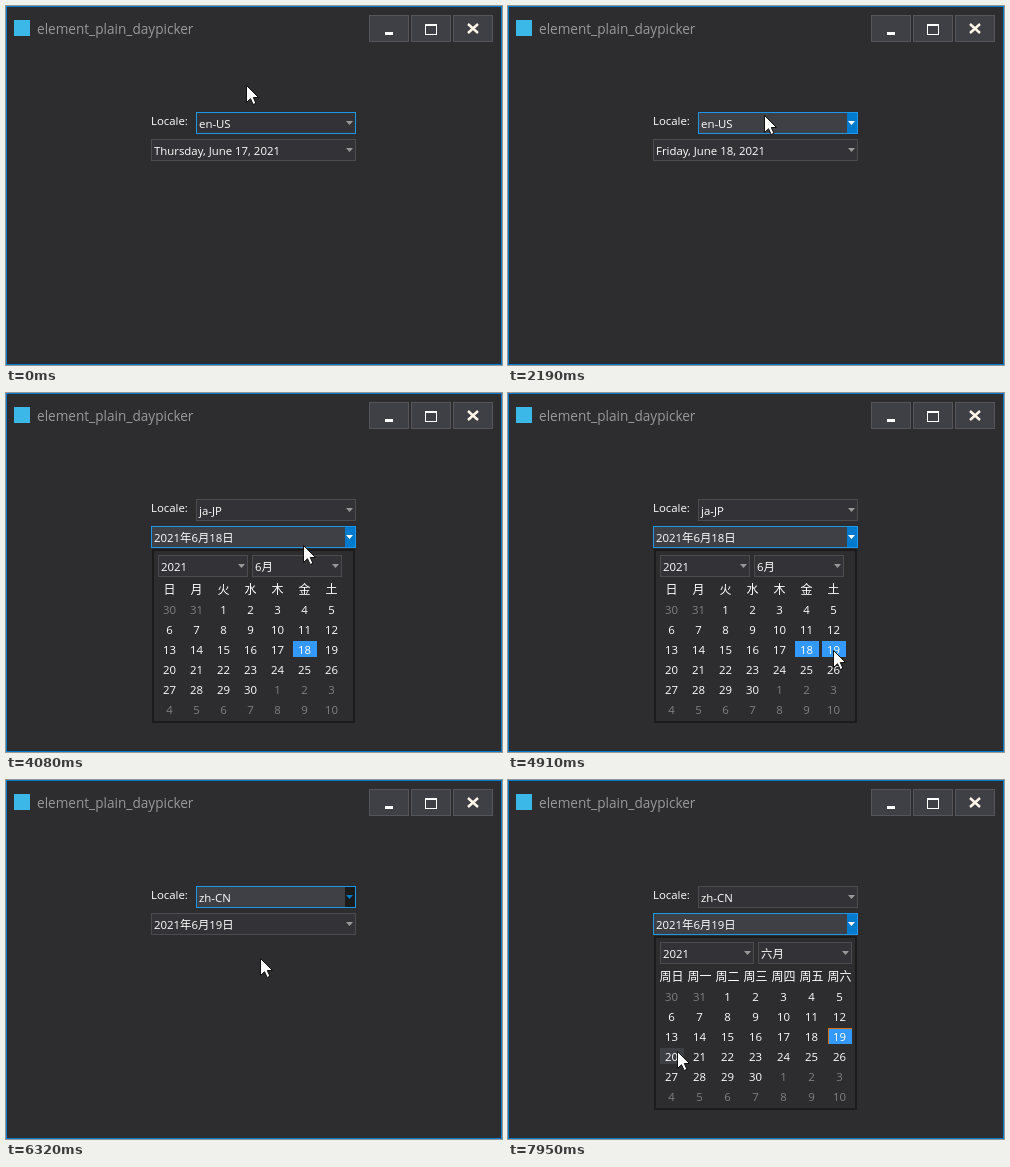
These frames come from a looping animation (496 by 359 pixels, 8 s). An HTML page with a canvas:

```html
<!DOCTYPE html>
<html lang="en">
<head>
<meta charset="utf-8">
<title>Date combo</title>
<style>
html, body { margin: 0; width: 100%; height: 100%; overflow: hidden; background: #2d2d30; }
canvas { display: block; }
</style>
</head>
<body>
<canvas id="stage" width="496" height="359"></canvas>
<script>
const ctx = document.getElementById('stage').getContext('2d');
const LOOP = 8000;
const BLUE = '#007acc', FOCUS = '#1c97ea', SELECTED = '#3399ff';
const BACK = '#2d2d30', FIELD = '#333337', HOT = '#3f3f46', DARK = '#1b1b1c', LINE = '#4b4b50';
const WHITE = '#ffffff', GRAY = '#999999', DIM = '#808080';

const LOCALES = [
  { name: 'en-US', month: 'June', step: 27, days: ['Sun', 'Mon', 'Tue', 'Wed', 'Thu', 'Fri', 'Sat'],
    date: d => `${['Thursday', 'Friday', 'Saturday'][d - 17]}, June ${d}, 2021` },
  { name: 'ja-JP', month: '6月', step: 27, days: [...'日月火水木金土'],
    date: d => `2021年6月${d}日` },
  { name: 'zh-CN', month: '六月', step: 28, days: [...'日一二三四五六'].map(c => '周' + c),
    date: d => `2021年6月${d}日` }
];

// Pointer moves: start time, end time, destination
const START = [240, 79];
const MOVES = [
  [70, 320, 256, 148], [760, 1240, 302, 257], [1580, 1960, 256, 109],
  [2550, 2860, 252, 161], [3220, 3640, 297, 152], [4100, 4400, 325, 257],
  [5060, 5450, 262, 114], [5850, 6120, 254, 178], [6450, 6620, 256, 146],
  [7310, 7950, 169, 271]
];
// Popups: owner, opening time, closing time, time the button is released
const POPUPS = [
  ['date', 620, 1500, 1580], ['locale', 2360, 3140, 3220], ['date', 3860, 5000, 5060],
  ['locale', 5710, 6240, 6450], ['date', 6740, LOOP, LOOP]
];
const FOCUS_CHANGES = [490, 2190, 3780, 5630, 6660];
const LOCALE_CHANGES = [3140, 6240];
const DAY_CHANGES = [1500, 5000];
const DAY_PRESSES = [[1380, 18], [4910, 19]];

const passed = (times, t) => times.filter(time => t >= time).length;

function pointerAt(t) {
  let [x, y] = START;
  for (const [from, to, endX, endY] of MOVES) {
    if (t < from) break;
    const p = Math.min(1, (t - from) / (to - from));
    const eased = p * p * (3 - 2 * p);
    x += (endX - x) * eased;
    y += (endY - y) * eased;
  }
  return [Math.round(x), Math.round(y)];
}

function rect(x, y, w, h, color) {
  ctx.fillStyle = color;
  ctx.fillRect(x, y, w, h);
}

function frame(x, y, w, h, fill, border) {
  rect(x, y, w, h, border);
  rect(x + 1, y + 1, w - 2, h - 2, fill);
}

function text(string, x, y, color = WHITE, size = 11.4, align = 'left') {
  ctx.font = `${size}px "Open Sans", "Noto Sans CJK SC", "Noto Sans CJK JP", "Noto Sans CJK", sans-serif`;
  ctx.textAlign = align;
  ctx.fillStyle = color;
  ctx.fillText(string, x, y);
}

function polygon(points, color) {
  ctx.beginPath();
  points.forEach(([x, y]) => ctx.lineTo(x, y));
  ctx.closePath();
  ctx.fillStyle = color;
  ctx.fill();
}

function inside([px, py], x, y, w, h) {
  return px >= x && px < x + w && py >= y && py < y + h;
}

function combo(x, y, w, label, { focused = false, hot = false, pressed = false } = {}) {
  const active = hot || pressed;
  const right = x + w;
  frame(x, y, w, 22, active ? HOT : FIELD, focused ? FOCUS : LINE);
  if (active) rect(right - 11, y + 1, 10, 20, pressed ? DARK : BLUE);
  const arrow = pressed ? BLUE : hot ? WHITE : GRAY;
  polygon([[right - 10, y + 9], [right - 3, y + 9], [right - 6.5, y + 13]], arrow);
  text(label, x + 3, y + 16);
}

function titleBar() {
  frame(0, 0, 496, 359, BACK, BLUE);
  rect(8, 14, 16, 16, '#3bb8e8');
  text('element_plain_daypicker', 31, 28, GRAY, 13.6);
  for (const x of [363, 405, 447]) frame(x, 9, 40, 27, HOT, '#55555b');
  rect(379, 26, 8, 3, WHITE);
  frame(419, 18, 12, 11, HOT, WHITE);
  rect(419, 18, 12, 2, WHITE);
  ctx.strokeStyle = '#fff8ea';
  ctx.lineWidth = 2.4;
  ctx.beginPath();
  ctx.moveTo(462, 18); ctx.lineTo(472, 27);
  ctx.moveTo(472, 18); ctx.lineTo(462, 27);
  ctx.stroke();
}

function localeList(current, pointer) {
  rect(191, 129, 158, 66, DARK);
  frame(193, 131, 154, 62, '#252526', LINE);
  LOCALES.forEach(({ name }, i) => {
    const y = 132 + 20 * i;
    if (i === current) rect(194, y, 152, 20, SELECTED);
    else if (inside(pointer, 194, y, 152, 20)) rect(194, y, 152, 20, HOT);
    text(name, 199, y + 15);
  });
}

function calendar(localeIndex, selected, pressedDay, pointer) {
  const { month, step, days } = LOCALES[localeIndex];
  const comboWidth = localeIndex === 2 ? 94 : 90;
  frame(146, 156, 203, 174, BACK, DARK);
  frame(147, 157, 201, 172, BACK, DARK);
  [['2021', 152], [month, 156 + comboWidth]].forEach(([label, x]) =>
    combo(x, 162, comboWidth, label, { hot: inside(pointer, x, 162, comboWidth, 22) }));
  days.forEach((day, i) =>
    text(day, 163.5 + step * i, 201, WHITE, localeIndex ? 12 : 11.4, 'center'));

  for (let i = 0; i < 42; i++) {
    const x = 152 + step * (i % 7), y = 208 + 20 * Math.floor(i / 7);
    const offset = i - 1;
    const inMonth = offset >= 1 && offset <= 30;
    const label = offset < 1 ? 31 + offset : inMonth ? offset : offset - 30;
    if (inMonth && (offset === selected || offset === pressedDay)) {
      rect(x, y, 24, 16, SELECTED);
      if (localeIndex === 2) {
        rect(x, y, 24, 1, '#d9730d');
        rect(x, y, 1, 16, '#d9730d');
      }
    } else if (inside(pointer, x, y, 24, 16)) {
      rect(x, y, 24, 16, HOT);
    }
    text(label, x + 11.5, y + 12.5, inMonth ? WHITE : DIM, 11.4, 'center');
  }
}

function drawPointer([x, y]) {
  const shape = [[0, 0], [0, 17], [4, 13.2], [6.7, 19], [9.4, 17.8], [6.8, 12], [12, 12]]
    .map(([dx, dy]) => [x + dx + .5, y + dy + .5]);
  polygon(shape, WHITE);
  ctx.strokeStyle = '#111';
  ctx.lineWidth = 1;
  ctx.stroke();
}

function draw(t) {
  const pointer = pointerAt(t);
  const localeIndex = passed(LOCALE_CHANGES, t);
  const day = 17 + passed(DAY_CHANGES, t);
  const focus = passed(FOCUS_CHANGES, t) % 2 ? 'date' : 'locale';
  const popup = POPUPS.find(([, from, to]) => t >= from && t < to);
  const open = popup && popup[0];
  const released = POPUPS.find(([, , to, end]) => t >= to && t < end);
  const style = (name, x, y, w) => ({
    focused: focus === name,
    hot: open ? open === name : inside(pointer, x, y, w, 22),
    pressed: Boolean(released && released[0] === name)
  });

  titleBar();
  text('Locale:', 145, 119);
  combo(190, 106, 160, LOCALES[localeIndex].name, style('locale', 190, 106, 160));
  combo(145, 133, 205, LOCALES[localeIndex].date(day), style('date', 145, 133, 205));
  if (open === 'locale') localeList(localeIndex, pointer);
  if (open === 'date') {
    const press = DAY_PRESSES.find(([from, d]) => t >= from && d === day + 1);
    calendar(localeIndex, day, press && press[1], pointer);
  }
  drawPointer(pointer);
}

const begin = performance.now();
function tick() {
  draw((performance.now() - begin) % LOOP);
  requestAnimationFrame(tick);
}
tick();
</script>
</body>
</html>
```
